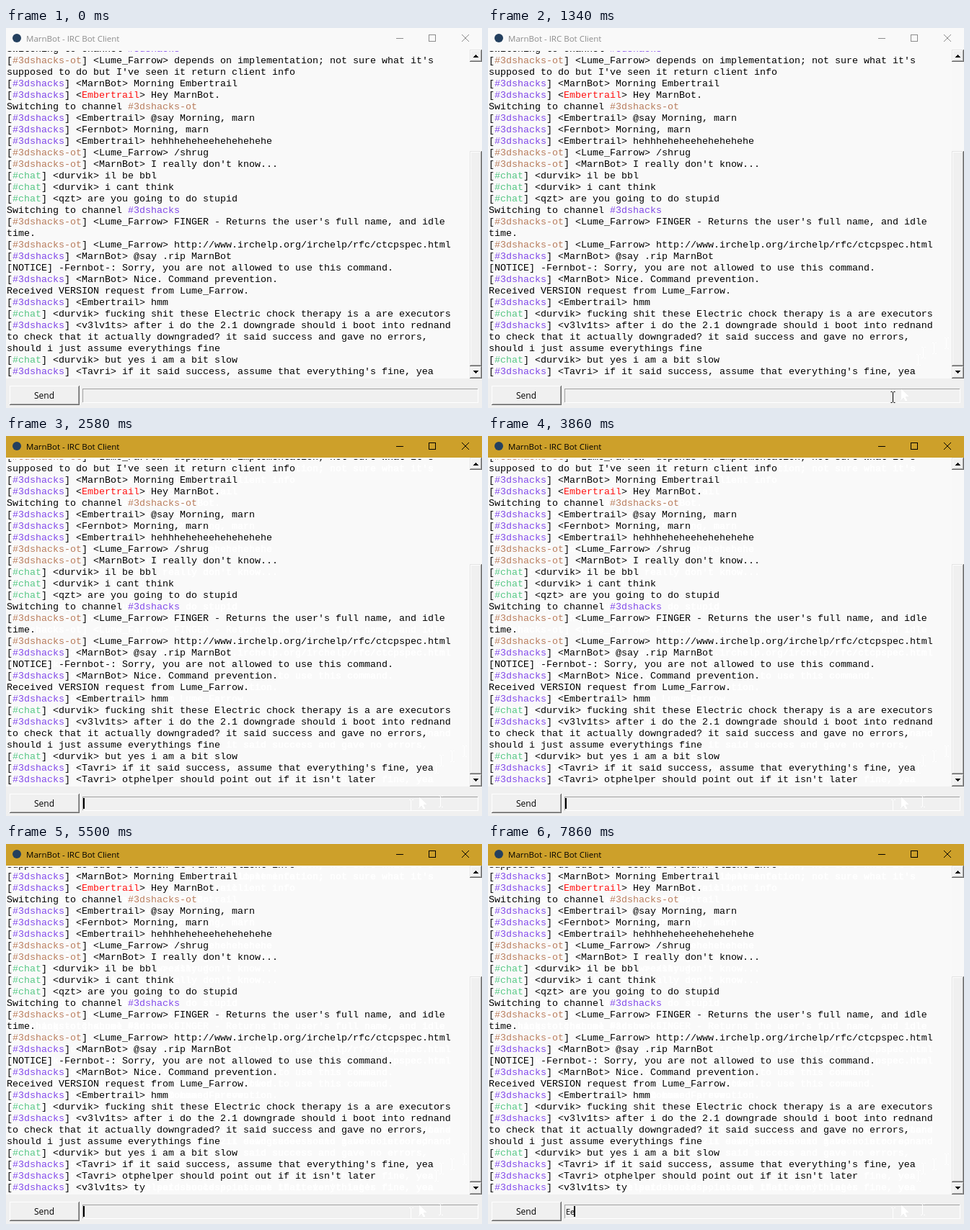
Write an HTML page that moves like this. It is 660x528 px and loops after 8000 ms.

```html
<!DOCTYPE html>
<html lang="en">
<head>
<meta charset="utf-8">
<title>MarnBot - IRC Bot Client</title>
<style>
  html, body { margin: 0; width: 100%; height: 100%; overflow: hidden; background: #f0f0f0; }
  #stage { position: relative; width: 660px; height: 528px; overflow: hidden; }
  svg { position: absolute; left: 0; top: 0; }
  svg text { font: 11.5px "Open Sans", "Noto Sans", sans-serif; }
  svg #label { font-size: 12px; }
  svg #typed { font-size: 11px; }
  #chat { position: absolute; left: 0; top: 32px; width: 643px; height: 454px; overflow: hidden; }
  .log { position: absolute; left: 1px; top: -10px; white-space: pre; color: #000;
         font: 13.333px/16px "Liberation Mono", "Courier New", monospace; }
  .main { color: #8048e8; }
  .ot { color: #b87c5c; }
  .talk { color: #56c684; }
  .ping { color: #ff1010; }
  .old, .old span { color: #fff; -webkit-text-stroke: .6px #fff; }
  .off { visibility: hidden; }
</style>
</head>
<body>
<div id="stage">
  <svg id="chrome" width="660" height="528" shape-rendering="crispEdges">
    <rect width="660" height="528" fill="#f0f0f0"/>
    <rect id="bar" width="660" height="30"/>
    <rect y="30" width="643" height="457" fill="#f9f9f9"/>
    <circle cx="15" cy="14" r="6" fill="#24405f" shape-rendering="auto"/>
    <g id="caption">
      <text x="28" y="19" stroke="none">MarnBot - IRC Bot Client</text>
      <path d="M541 14.5H551M586.5 9.5h9v9h-9z" fill="none"/>
      <path d="M632 9l10 10M642 9l-10 10" fill="none" shape-rendering="auto"/>
    </g>
    <rect x="643" y="30" width="17" height="457" fill="#f8f8f8"/>
    <g id="scroll"></g>
    <g id="send"></g>
    <text id="label" x="53" y="515" text-anchor="middle">Send</text>
    <path d="M106.5 520V501.5H654" fill="none" stroke="#a0a0a0"/>
    <path d="M107 520.5H654.5V502" fill="none" stroke="#fff"/>
    <g id="trail"></g>
    <text id="typed" x="108" y="515"></text>
    <rect id="caret" y="503" width="2" height="15"/>
  </svg>
  <div id="chat"></div>
  <svg id="top" width="660" height="528"></svg>
</div>
<script>
const LOOP = 8000;
const $ = id => document.getElementById(id);

const lines = [
  "Switching to channel #3dshacks",
  "[#3dshacks-ot] <Lume_Farrow> depends on implementation; not sure what it's",
  "supposed to do but I've seen it return client info",
  "[#3dshacks] <MarnBot> Morning Embertrail",
  "[#3dshacks] <Embertrail> Hey MarnBot.",
  "Switching to channel #3dshacks-ot",
  "[#3dshacks] <Embertrail> @say Morning, marn",
  "[#3dshacks] <Fernbot> Morning, marn",
  "[#3dshacks] <Embertrail> hehhheheheehehehehehe",
  "[#3dshacks-ot] <Lume_Farrow> /shrug",
  "[#3dshacks-ot] <MarnBot> I really don't know...",
  "[#chat] <durvik> il be bbl",
  "[#chat] <durvik> i cant think",
  "[#chat] <qzt> are you going to do stupid",
  "Switching to channel #3dshacks",
  "[#3dshacks-ot] <Lume_Farrow> FINGER - Returns the user's full name, and idle",
  "time.",
  "[#3dshacks-ot] <Lume_Farrow> http://www.irchelp.org/irchelp/rfc/ctcpspec.html",
  "[#3dshacks] <MarnBot> @say .rip MarnBot",
  "[NOTICE] -Fernbot-: Sorry, you are not allowed to use this command.",
  "[#3dshacks] <MarnBot> Nice. Command prevention.",
  "Received VERSION request from Lume_Farrow.",
  "[#3dshacks] <Embertrail> hmm",
  "[#chat] <durvik> fucking shit these Electric chock therapy is a are executors",
  "[#3dshacks] <v3lv1ts> after i do the 2.1 downgrade should i boot into rednand",
  "to check that it actually downgraded? it said success and gave no errors,",
  "should i just assume everythings fine",
  "[#chat] <durvik> but yes i am a bit slow",
  "[#3dshacks] <Tavri> if it said success, assume that everything's fine, yea",
  "[#3dshacks] <Tavri> otphelper should point out if it isn't later",
  "[#3dshacks] <v3lv1ts> ty"
];
const ROWS = 29;
const kinds = { "#3dshacks": "main", "#3dshacks-ot": "ot", "#chat": "talk" };

function paint(line) {
  return line.replace(/</g, "&lt;").replace(/>/g, "&gt;")
    .replace(/#(3dshacks-ot|3dshacks|chat)/, m => `<span class="${kinds[m]}">${m}</span>`)
    .replace(/Embertrail(?=&gt; Hey)/, '<span class="ping">$&</span>');
}

function addLog(first, cls) {
  const el = document.createElement("div");
  el.className = "log " + cls;
  el.innerHTML = lines.slice(first, first + ROWS).map(paint).join("\n");
  $("chat").append(el);
  return el;
}
const ghosts = [0, 1].map(n => addLog(n, "old"));
const logs = [0, 1, 2].map(n => addLog(n, ""));

// Raised grey box: two light edges, two dark edges
function raised(x, y, w, h, outer, inner) {
  const r = x + w, b = y + h;
  const edge = (d, color) => `<path d="${d}" fill="none" stroke="${color}"/>`;
  return `<rect x="${x}" y="${y}" width="${w}" height="${h}" fill="#f0f0f0"/>` +
    edge(`M${x + .5} ${b - 1}V${y + .5}H${r - 1}`, outer) +
    edge(`M${x + 1.5} ${b - 2}V${y + 1.5}H${r - 2}`, inner) +
    edge(`M${x + 1} ${b - 1.5}H${r - 1.5}V${y + 1}`, "#a0a0a0") +
    edge(`M${x} ${b - .5}H${r - .5}V${y}`, "#696969");
}
const slider = (y0, y1) => raised(643, y0, 17, y1 - y0, "#e3e3e3", "#fff");
const arrows = slider(30, 47) + slider(470, 487) +
  '<path d="M647 41h8l-4-4zM647 476h8l-4 4z"/>';
$("send").innerHTML = raised(5, 497, 97, 27, "#fff", "#f0f0f0");

const beam = "M-3 -7.5H-1M1 -7.5H3M-3 7.5H-1M1 7.5H3M0 -7V7";
const pointer = "M.5 .5V16.5L4.2 13L6.8 18.5L9.2 17.5L6.8 12H11.5Z";
function cursor(kind, x, y, ghost) {
  const line = ghost ? "#fff" : "#000";
  return kind === "I"
    ? `<path transform="translate(${x + .5} ${y})" d="${beam}" fill="none" stroke="${line}"/>`
    : `<path transform="translate(${x} ${y})" d="${pointer}" fill="#fff" stroke="${ghost ? "none" : line}"/>`;
}

// time, shape, x, y, leaves a pale mark
const moves = [
  [100, "A", 650, 422, 0], [860, "I", 635, 438, 1], [900, "I", 618, 445, 1],
  [940, "I", 603, 451, 1], [980, "I", 596, 461, 1], [1040, "A", 582, 489, 0],
  [1100, "A", 572, 500, 1], [1160, "I", 561, 513, 0], [1200, "I", 560, 515, 0],
  [1220, "I", 561, 513, 1], [1540, "I", 578, 511, 0], [1600, "I", 602, 508, 1],
  [1660, "A", 604, 522, 0], [1720, "", 0, 0, 0]
];
const FOCUS = 1500;
const thumbs = [[0, 171, 470], [2440, 168, 460], [2580, 178, 470], [3920, 184, 470]];
const scrolls = [[0, 0], [2580, 1], [3920, 2]];
const typing = [[0, "", 107], [6760, "E", 113], [7860, "Ee", 119]];
// The caret flips at each of these times
const flips = [FOCUS, 1860, 2240, 2620, 2800, 3000, 3340, 3500, 3860, 3920, 3940, 4040,
  4400, 4580, 4940, 5120, 5500, 5700, 6040, 6220, 6580, 7040, 7120, 7300, 7660];

const at = (table, t) => table.filter(row => row[0] <= t).pop();
const show = (el, on) => el.classList.toggle("off", !on);
const seen = {};
function fill(id, html) {
  if (seen[id] !== html) $(id).innerHTML = seen[id] = html;
}

function render(t) {
  const active = t >= FOCUS;
  $("bar").setAttribute("fill", active ? "#cda02a" : "#f9f9f9");
  const ink = active ? "#000" : "#8c8c8c";
  $("caption").setAttribute("fill", ink);
  $("caption").setAttribute("stroke", ink);

  const n = at(scrolls, t)[1];
  logs.forEach((el, i) => show(el, i === n));
  ghosts.forEach((el, i) => show(el, i < n));

  const [, y0, y1] = at(thumbs, t);
  fill("scroll", slider(y0, y1) + arrows);

  const done = moves.filter(m => m[0] <= t);
  const now = done.pop();
  fill("trail", done.filter(m => m[4]).map(m => cursor(m[1], m[2], m[3], true)).join(""));
  fill("top", now && now[1] ? cursor(now[1], now[2], now[3], false) : "");

  const [, word, x] = at(typing, t);
  fill("typed", word);
  $("caret").setAttribute("x", x);
  show($("caret"), flips.filter(f => f <= t).length % 2 === 1);
}

const start = performance.now();
function tick() {
  render((performance.now() - start) % LOOP);
  requestAnimationFrame(tick);
}
render(0);
requestAnimationFrame(tick);
</script>
</body>
</html>
```
